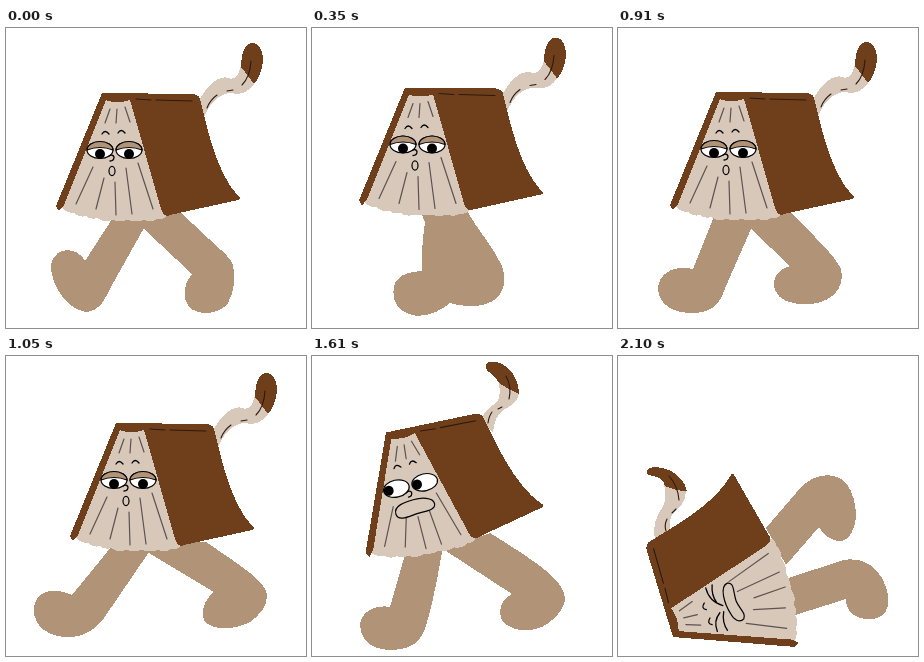
These frames come from a looping animation (300x300 px, 2450 ms). An HTML page:

```html
<!DOCTYPE html>
<html lang="en">
<head>
<meta charset="utf-8">
<title>Walking book</title>
<style>
  html, body { margin: 0; width: 100%; height: 100%; overflow: hidden; background: #fff; }
  svg { display: block; width: 100vw; height: 100vh; }
  .cover, .page, .leg { shape-rendering: crispEdges; }
  .cover { fill: #6f3f1b; }
  .page { fill: #d8c8b9; }
  .leg { fill: #b19377; }
  .line { fill: none; stroke: #5c5250; stroke-width: 1.2; stroke-linecap: round; }
  .ink { fill: none; stroke: #000; stroke-width: 1.3; stroke-linecap: round; stroke-linejoin: round; }
  .crease { fill: none; stroke: #2b1a0e; stroke-width: 1.1; stroke-linecap: round; }
  .white { fill: #fff; stroke: #000; stroke-width: 1.2; }
  .lid { fill: #b19377; stroke: #000; stroke-width: 1.2; }
  .lips { fill: #d8c8b9; stroke: #000; stroke-width: 1.2; }
</style>
</head>
<body>
<svg id="stage" viewBox="0 0 300 300"></svg>
<script>
const HOLD = 350;
const path = (cls, d) => `<path class="${cls}" d="${d}"/>`;

// The book is drawn once, upright; each pose moves and turns it about its top left corner.
const book =
  path('page', 'M98 71 L126 71 L161 187 Q158 192 151 191 Q146 195 138 192 Q130 195 122 192 Q114 194 106 192 Q97 195 91 190 Q84 192 80 188 Q73 190 68 185 Q61 185 56 180 Z') +
  path('cover', 'M96 65 L100 72 L58 177 L53 183 L50 178 Z') +
  path('cover', 'M96 65 L187 66 Q193 67 194 71 C201 99 210 144 232 168 Q236 171 232 172 L164 187 Q158 190 155 181 L124 72 Q112 76 99 72 Z') +
  path('crease', 'M130 71 L145 72 M150 72 L186 73') +
  path('line', 'M104 81 L99 95 M111 81 L110 95 M119 79 L124 94 M87 139 L70 176 M98 150 L90 181 M109 154 L110 187 M120 140 L126 186 M132 135 L147 181');

const brows = path('ink', 'M96 106 Q99 101 103 106 M112 105 Q115 100 119 105');
const raisedBrows = `<g transform="translate(0 -4)">${brows}</g>`;
const nose = path('ink', 'M103 128 Q107 126 108 129 Q108 133 104 133');
const eye = (x, y, dx, dy) =>
  `<ellipse class="white" cx="${x}" cy="${y}" rx="13" ry="8.5"/><circle cx="${x + dx}" cy="${y + dy}" r="5"/>`;
const lid = (x, y) => path('lid', `M${x - 13} ${y} A13 8.5 0 0 1 ${x + 13} ${y} Q${x} ${y - 5} ${x - 13} ${y} Z`);
const eyes = (dx, dy) => eye(94, 122, dx, dy) + eye(123, 122, dx, dy);

const sleepy = brows + eyes(0, 4) + lid(94, 122) + lid(123, 122) + nose +
  '<ellipse class="lips" cx="106" cy="143" rx="3" ry="4.6"/>';
const worried = raisedBrows + eyes(-8, 0.5) + nose +
  path('lips', 'M88 147 C87 138 100 137 108 136.5 S128 138 128 145 S116 150 108 151 S89 155 88 147 Z');
const scared = raisedBrows + eyes(-8, 0) + nose +
  path('lips', 'M88 143 C93 135 104 135 114 135 C122 136 128 141 127 145 C125 148 121 144 115 142 C107 140 101 141 94 146 C90 148 87 147 88 143 Z');
const hurt = brows +
  path('ink', 'M133 111 Q119 110 111 122 M134 118 Q124 114 116 117 M105 117 Q99 108 88 109 M105 121 Q95 116 86 119') +
  path('lips', 'M131 133 C130 140 122 136 111 136 C102 137 97 142 92 138 C89 133 94 128 101 127 C112 124 130 124 131 133 Z');

const tail = (stem, tip, marks) => path('page', stem) + path('cover', tip) + path('crease', marks);
const tailUp = tail(
  'M193 72 C203 55 213 47 222 50 S233 44 235 38 L248 56 C243 63 235 68 226 65 C213 65 204 75 198 89 Z',
  'M235 39 C235 28 238 15 247 15 C257 16 259 32 255 43 Q252 52 248 56 Q243 49 235 39 Z',
  'M201 80 Q204 72 211 67 M221 63 L227 62 M236 57 Q244 49 245 33');
const tailBent = tail(
  'M207 38 C206 46 198 50 193 53 C185 58 182 66 181 76 L168 66 C172 54 180 50 185 46 Q189 40 187 27 Z',
  'M174 8 C178 3 190 6 197 13 C204 20 207 30 207 38 Q197 34 187 27 Q183 20 177 16 Q173 13 174 8 Z',
  'M176 67 Q177 60 180 56 M186 53 L190 51 M197 43 Q200 31 194 20');
const tailLow = tail(
  'M106 12 C114 18 118 26 114 33 C113 38 117 44 127 52 L101 43 C98 37 103 28 100 24 Q97 22 93 21 Z',
  'M64 27 C61 17 74 8 90 7 C98 7 103 9 106 12 Q100 17 93 21 Q84 19 79 25 C73 28 66 28 64 27 Z',
  'M82 13 Q95 12 104 20 M112 30 L112 36');
const tailCurled = tail(
  'M68 135 C68 145 62 152 56 156 C51 162 51 170 53 176 L37 184 C34 172 38 160 44 152 Q50 142 46 129 Q58 135 68 135 Z',
  'M29 115 C30 110 42 110 51 114 C60 118 67 126 69 135 Q58 135 47 130 C46 122 37 120 31 119 Q28 118 29 115 Z',
  'M51 120 Q60 130 61 144 M58 153 L54 157 M49 163 Q46 169 48 175');

const poses = [
  { at: [96, 65], turn: 0, face: sleepy, tail: tailUp,
    legs: 'M108 188 L79 233 C72 219 50 217 45 236 C44 256 60 281 80 284 C94 283 99 271 106 257 L138 200 L150 185 Z M138 201 L186 246 C177 256 176 270 183 279 C193 288 213 287 222 275 C229 263 229 248 227 237 C223 226 206 216 176 185 L140 185 Z' },
  { at: [93, 59.5], turn: 0, face: sleepy, tail: tailUp,
    legs: 'M109 185 L155 183 C165 201 182 220 190 238 C198 262 185 278 160 278 Q148 278 138 275 C128 284 112 290 100 287 C82 283 78 265 84 253 C90 244 102 244 110 243 Q109 222 113 194 Z' },
  { at: [98, 64], turn: 0, face: sleepy, tail: tailUp,
    legs: 'M97 186 L75 241 C60 237 41 243 40 260 C40 278 58 286 78 285 C98 283 103 272 108 258 L133 201 L140 185 Z M133 201 L172 238 C158 242 154 252 157 262 C162 276 185 279 203 274 C220 268 226 255 223 241 C216 226 195 208 174 185 L133 185 Z' },
  { at: [110, 67], turn: 0, face: sleepy, tail: tailUp,
    legs: 'M106 190 L66 239 C52 232 32 232 28 250 C26 270 42 281 62 281 C80 281 90 272 98 262 L143 196 L143 185 Z M143 197 L208 236 C198 244 194 256 199 266 C210 275 228 274 244 266 C256 258 264 245 260 235 C254 222 238 212 200 186 L143 185 Z' },
  { at: [74, 76.5], turn: -12.5, face: worried, tail: tailBent,
    legs: 'M94 195 L78 251 C62 248 48 257 48 270 C50 288 64 294 80 294 C98 293 106 288 112 275 Q120 255 131 190 Z M131 193 L200 238 C188 244 186 256 190 264 C198 275 215 277 230 271 C246 262 256 248 252 237 C247 222 228 208 178 177 Z' },
  { at: [32, 103], turn: -42.5, face: scared, tail: tailLow,
    legs: 'M102 200 L104 247 C88 248 77 260 78 273 C82 290 100 295 115 292 C133 285 143 270 144 248 L139 175 Z M160 123 L240 104 C255 102 268 107 270 125 C270 145 262 166 247 173 C234 174 224 164 224 146 L155 164 Z' },
  { at: [55, 281], turn: -107.5, face: hurt, tail: tailCurled,
    legs: 'M148 172 L178 137 C193 116 217 115 228 127 C235 136 238 148 238 162 C235 180 228 186 219 185 C211 183 205 178 201 171 L168 209 Z M170 222 L226 204 C244 201 256 209 264 222 C271 235 273 248 267 257 C257 267 242 264 233 257 Q228 251 228 243 L174 260 Z' }
];

const drawPose = ({ at: [x, y], turn, face, tail, legs }) =>
  `<g class="pose">${path('leg', legs)}` +
  // The upright tail travels with the book; bent tails are placed on the stage.
  (turn ? tail : `<g transform="translate(${x - 96} ${y - 65})">${tail}</g>`) +
  `<g transform="translate(${x} ${y}) rotate(${turn}) translate(-96 -65)">${book}${face}</g></g>`;

const stage = document.getElementById('stage');
stage.innerHTML = poses.map(drawPose).join('');

const share = 1 / poses.length;
const duration = HOLD * poses.length;
[...stage.querySelectorAll('.pose')].forEach((pose, i) => {
  const show = pose.animate([
    { opacity: 1, offset: 0 },
    { opacity: 1, offset: share },
    { opacity: 0, offset: share },
    { opacity: 0, offset: 1 }
  ], { duration, iterations: Infinity, delay: i * HOLD - duration });
  show.startTime = document.timeline.currentTime;
});
</script>
</body>
</html>
```
